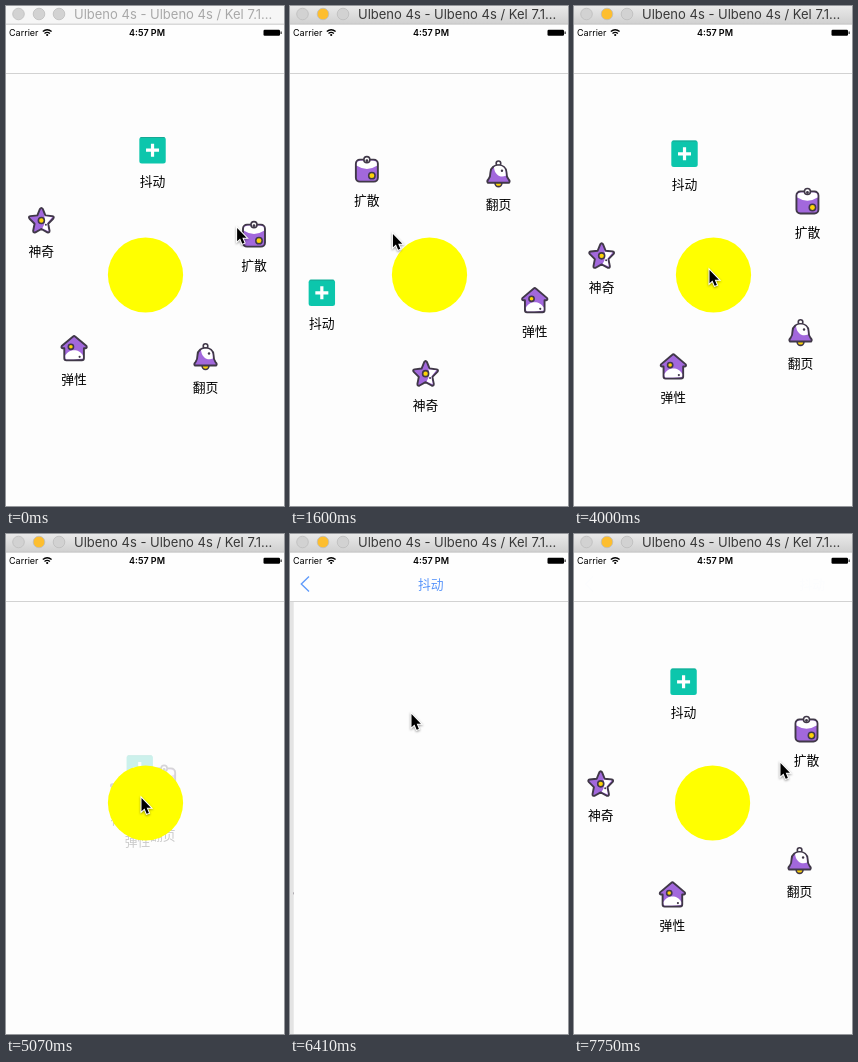
Animation of 278x500 px, one loop 8000 ms. Source, as an HTML page:

```html
<!DOCTYPE html>
<html lang="zh">
<head>
<meta charset="utf-8">
<style>
html, body { margin: 0; width: 100%; height: 100%; overflow: hidden; background: #fdfdfd; }
svg { display: block; width: 278px; height: 500px; }
text { font-family: Inter, Roboto, sans-serif; }
.label { font: 12.8px "Noto Sans CJK SC", "Noto Sans CJK", sans-serif; text-anchor: middle; }
.icon { stroke: #403848; stroke-width: 1.9; stroke-linejoin: round; fill: #a268dc; }
.white { fill: #fff; }
.yellow { fill: #fcd308; }
.patch { fill: #fff; stroke: none; }
.dot { fill: #403848; stroke: none; }
#pointer { filter: drop-shadow(0 1px 1px #0006); }
</style>
</head>
<body>
<svg viewBox="0 0 278 500">
  <defs>
    <linearGradient id="chrome" x2="0" y2="1">
      <stop stop-color="#e9e9e9"/><stop offset="1" stop-color="#d0d0d0"/>
    </linearGradient>
  </defs>

  <rect width="278" height="500" fill="#fdfdfd"/>
  <g id="menu">
    <g class="item">
      <rect x="-13.2" y="-13.2" width="26.4" height="26.4" rx="2.5" fill="#0cc6ac"/>
      <path d="M-12-12.7H12" stroke="#18a894"/>
      <path d="M-6.5 0H6.5M0-6.5V6.5" stroke="#fff" stroke-width="3.2"/>
      <text class="label" y="35.6">抖动</text>
    </g>
    <g class="item">
      <g class="icon">
        <rect x="-11" y="-9.5" width="22" height="22" rx="4"/>
        <path class="patch" d="M-10-3.5V-5.5Q-10-8.5-6-8.5H6Q10-8.5 10-5.5V-3.5Q0 3-10-3.5Z"/>
        <circle class="white" cy="-9.5" r="3" stroke-width="1.6"/>
        <circle class="dot" cy="-8.5" r="1.4"/>
        <circle class="yellow" cx="5" cy="6.5" r="3.2" stroke-width="1.5"/>
      </g>
      <text class="label" y="35.6">扩散</text>
    </g>
    <g class="item">
      <g class="icon">
        <circle class="white" cy="-10.5" r="2.3" stroke-width="1.6"/>
        <circle class="yellow" cy="9.5" r="3.4" stroke-width="1.6"/>
        <path d="M-10.5 9Q-12 7.5-10 5.5-8 3-8-1.5C-8-11 8-11 8-1.5Q8 3 10 5.5 12 7.5 10.5 9Z"/>
        <path class="patch" d="M-4.5-6.5C-1-9 7-8.5 7-1.5L7.4 2C2 4.5-4 1-4.5-6.5Z"/>
        <circle class="dot" cx="3.5" cy="-3" r="1.2"/>
      </g>
      <text class="label" y="35.6">翻页</text>
    </g>
    <g class="item">
      <g class="icon">
        <path d="M-1-11.8Q0-12.8 1-11.8L12.4-2.2Q13.2-.3 11.5 0H9.8V10Q9.8 12 7.8 12H-7.8Q-9.8 12-9.8 10V0H-11.5Q-13.2-.3-12.4-2.2Z"/>
        <path class="patch" d="M-8.8 7.5C-6 0 6 0 8.8 7.5V10Q8.8 11-7.8 11Q-8.8 11-8.8 7.5Z"/>
        <circle class="yellow" cx="-3.2" cy="-1.5" r="2.6" stroke-width="1.6"/>
        <circle class="dot" cx="5.5" cy="8.5" r="1.1"/>
      </g>
      <text class="label" y="35.6">弹性</text>
    </g>
    <g class="item">
      <g class="icon">
        <path d="M-1.4-11.8Q0-14 1.4-11.8L4-5.4 11-4.6Q13.4-4 11.8-2L6.8 3 8.2 10Q8.2 12.3 6 11.6L0 8.2-6 11.6Q-8.2 12.3-8.2 10L-6.8 3-11.8-2Q-13.4-4-11-4.6L-4-5.4Z"/>
        <path class="patch" d="M2.6-6L3.4-4.5 10.8-3.6 5.7 2.6 7.1 10.4 1 7.5Q5 1.5 2.6-6Z"/>
        <circle class="yellow" cy="-.3" r="3" stroke-width="1.6"/>
        <circle class="dot" cx="4.5" cy="4" r="1"/>
      </g>
      <text class="label" y="35.6">神奇</text>
    </g>
    <circle cx="139.5" cy="269" r="37.6" fill="#ff0"/>
  </g>
  <rect id="shade" width="278" height="500"/>
  <rect id="page" width="278" height="500" fill="#fdfdfd"/>

  <rect y="18" width="278" height="49.5" fill="#fefefe"/>
  <path d="M0 67.5H278" stroke="#d2d2d2"/>
  <g id="heading">
    <path d="M19 42.5L11.3 50 19 57.5" fill="none" stroke="#5f9afb" stroke-width="1.4"/>
    <text id="title" class="label" y="54.6" fill="#5793fa">抖动</text>
  </g>
  <g font-size="9">
    <text x="3" y="30">Carrier</text>
    <text x="141" y="30" text-anchor="middle" font-weight="600">4:57 PM</text>
  </g>
  <path d="M36.8 25.6Q41.2 21.8 45.6 25.6M38.5 27.5Q41.2 25.2 43.9 27.5" fill="none" stroke="#000" stroke-width="1.3"/>
  <circle cx="41.2" cy="29" r="1.1"/>
  <rect x="257.5" y="23.7" width="16.5" height="6" rx="1.2"/>
  <rect x="274.6" y="25.5" width="1" height="2.5"/>

  <rect id="bar" width="278" height="18"/>
  <path d="M0 18.2H278" stroke="#bcbcbc" stroke-width=".8"/>
  <g fill="#d2d2d2" stroke="#bdbdbd" stroke-width=".8">
    <circle cx="12.5" cy="8" r="5.8"/>
    <circle id="minimize" cx="33" cy="8" r="5.8"/>
    <circle cx="53" cy="8" r="5.8"/>
  </g>
  <text id="caption" x="68" y="13" font-size="13">Ulbeno 4s - Ulbeno 4s / Kel 7.1...</text>

  <path id="pointer" d="M0 0V13.3L3 10.6 5.2 15.8 7.4 14.9 5.2 9.8H9.4Z" stroke="#fff" stroke-width="2" paint-order="stroke"/>
</svg>
<script>
const LOOP = 8000, STEP = 267, WIDTH = 278;
const CX = 139.5, CY = 269, RADIUS = 112;
const $ = id => document.getElementById(id);
const items = [...document.querySelectorAll('.item')];

// Wheel angle in degrees at each step of the drag.
const spin = [3.6, 10, 25, 39.5, 75, 160, 254, 288, 301, 324, 344.3, 345];
// Pointer tips after the drag, as [step, x, y].
const path = [[11, 207, 196], [12, 180, 242], [13, 143, 196], [14, 129, 230], [15, 135.5, 264],
  [20, 135.5, 264], [21, 122, 200], [22, 121.5, 180], [24, 121.5, 180], [25, 91, 111],
  [26, 12, 31], [27, 12, 45], [28, 120, 150], [29, 206.5, 229]];

const smooth = u => { u = Math.min(1, Math.max(0, u)); return u * u * (3 - 2 * u); };
const decay = ms => { const u = Math.max(0, ms) / 95; return (1 + u) * Math.exp(-u); };
const polar = (deg, r) => {
  const a = deg * Math.PI / 180;
  return [r * Math.sin(a), -r * Math.cos(a)];
};
const move = (el, x, y) => el.setAttribute('transform', `translate(${x} ${y})`);

function tip(step) {
  if (step <= 10) {
    const lead = 59.2 + 5.4 * Math.sin(Math.PI * step / 10);
    const [x, y] = polar(spin[step] + lead, step < 6 ? 103 - 8 * step : 11 * step - 11);
    return [CX + x, CY + y];
  }
  const i = Math.max(1, path.findIndex(p => p[0] >= step));
  const [a, b] = [path[i - 1], path[i]];
  const u = (step - a[0]) / (b[0] - a[0]);
  return [a[1] + (b[1] - a[1]) * u, a[2] + (b[2] - a[2]) * u];
}

function draw(now) {
  const step = Math.floor((now % LOOP + 9) / STEP), t = step * STEP;

  const spread = 1 - smooth((t - 4145) / 500) + smooth((t - 4930) / 500);
  const angle = spin[Math.min(step, spin.length - 1)];
  items.forEach((item, i) => {
    const [x, y] = polar(angle + i * 72, RADIUS * spread);
    move(item, CX + x, CY - 13 + y);
    item.setAttribute('opacity', spread);
  });

  const pushed = t < 7126 ? 1 - decay(t - 5810) : decay(t - 7126);
  move($('menu'), -0.3 * WIDTH * pushed, 0);
  $('shade').setAttribute('opacity', 0.1 * pushed);
  move($('page'), WIDTH * (1 - pushed), 0);
  $('heading').setAttribute('opacity', pushed);
  $('title').setAttribute('x', 139.5 + 100 * (1 - pushed));

  const active = step > 0;
  $('bar').setAttribute('fill', active ? 'url(#chrome)' : '#f6f6f6');
  $('minimize').setAttribute('fill', active ? '#fdbe2f' : '#d2d2d2');
  $('caption').setAttribute('fill', active ? '#383838' : '#a8a8a8');
  move($('pointer'), ...tip(step));
}

const start = performance.now();
function tick() {
  draw(performance.now() - start);
  requestAnimationFrame(tick);
}
tick();
</script>
</body>
</html>
```
